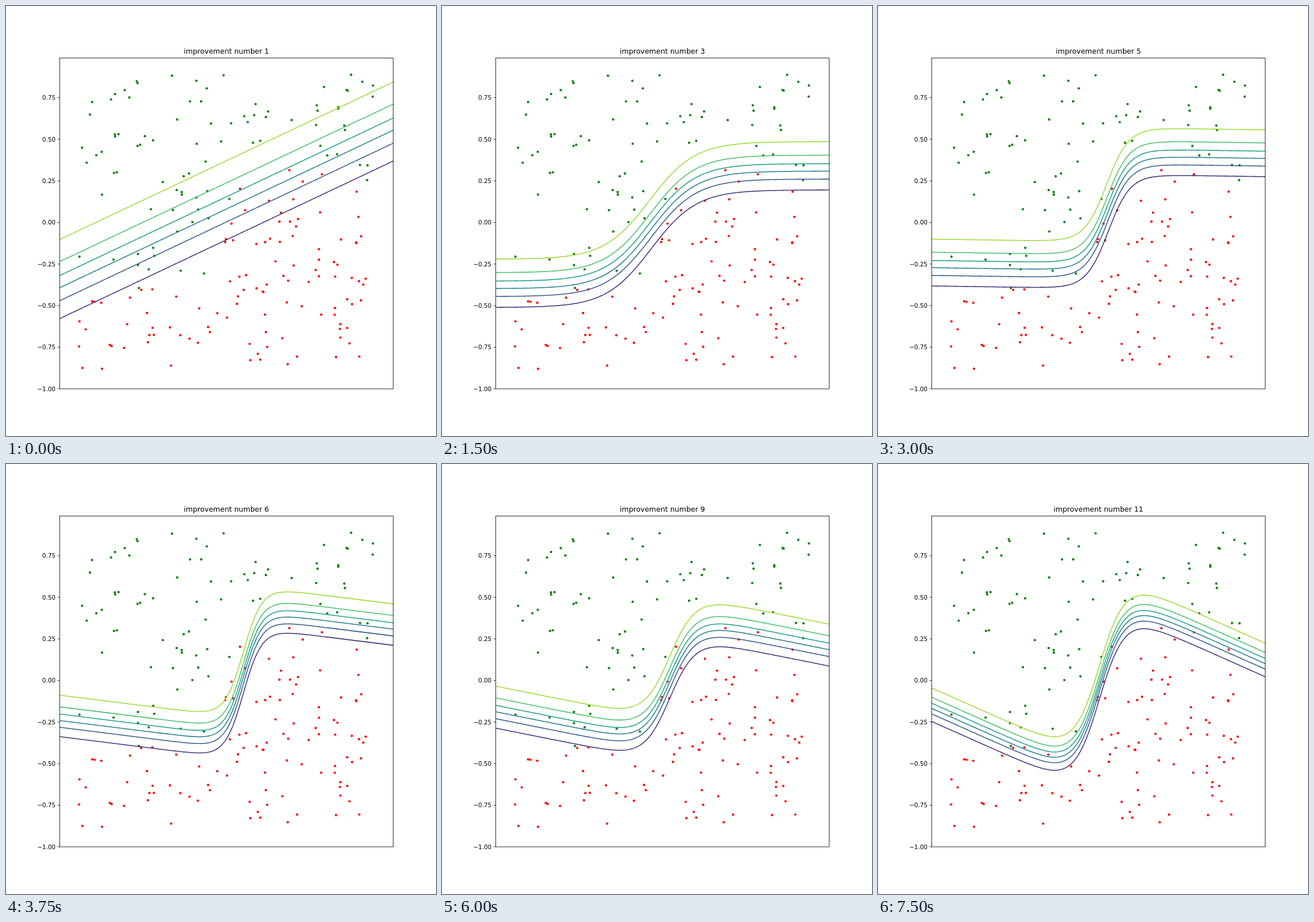
An HTML page that plays this animation: 748 by 748 pixels, repeating every 8000 ms.

```html
<!DOCTYPE html>
<html lang="en">
<head>
<meta charset="utf-8">
<title>Decision boundary</title>
<style>
  html, body { margin: 0; width: 100%; height: 100%; overflow: hidden; background: #fff; }
  svg { display: block; width: 100%; height: 100%; }
  text { font: 10.39px "DejaVu Sans", sans-serif; }
  #title { font-size: 12.47px; }
</style>
</head>
<body>
<svg id="plot" viewBox="0 0 748 748"></svg>
<script>
const STEP = 750, LOOP = 8000;
const LEFT = 93.5, RIGHT = 673.5, TOP = 90.5, BOTTOM = 666;
const svg = document.getElementById('plot');

function add(tag, attrs, text = '') {
  const node = document.createElementNS('http://www.w3.org/2000/svg', tag);
  for (const key in attrs) node.setAttribute(key, attrs[key]);
  node.textContent = text;
  svg.append(node);
  return node;
}

// Each fit is a tilted S-curve: vertical middle, slope, half rise, centre and width.
// spread is the distance between the outer contours, lean their sideways shift,
// ramp half the length of a straight middle part.
const base = { mid: 326.5, slope: 0, rise: 0, center: 366, width: 45, spread: 73, lean: 0, ramp: 1 };
const fits = {
  1: { mid: 277.5, slope: -0.4724, spread: 137.5 },
  2: { mid: 330, rise: 150, width: 180, spread: 114 },
  3: { mid: 338.2, rise: 102.2, center: 361, width: 79, spread: 84, lean: 3 },
  5: { mid: 310.7, slope: 0.015, rise: 99.4, center: 397.5, width: 38.5, spread: 81.5, lean: 3 },
  6: { slope: 0.125, rise: 115.7, center: 413, width: 32.5, spread: 72 },
  8: { rise: 102.3, center: 411, width: 29, spread: 74, lean: -22, ramp: 55.4 },
  9: { mid: 335, slope: 0.2, rise: 112, center: 396 },
  10: { mid: 352.75, slope: 0.66, rise: 210.8, center: 388, width: 54 },
  11: { mid: 351.25, slope: 0.445, rise: 168, center: 385, spread: 58.4 }
};

// A step without its own fit lies halfway between its neighbours.
function fitAt(step) {
  if (fits[step]) return { ...base, ...fits[step] };
  const before = fitAt(step - 1), after = fitAt(step + 1), mean = {};
  for (const key in base) mean[key] = (before[key] + after[key]) / 2;
  return mean;
}

function curveY({ mid, slope, rise, center, width, spread, lean, ramp }, share, x) {
  const u = x - center - lean * share;
  const bend = width / (2 * ramp) *
    Math.log(Math.cosh((u + ramp) / width) / Math.cosh((u - ramp) / width));
  return mid + spread * share + slope * u - rise * bend;
}

function curvePath(fit, share) {
  const points = [];
  for (let x = LEFT; x <= RIGHT; x += 2) points.push(x + ' ' + curveY(fit, share, x).toFixed(2));
  return 'M' + points.join('L');
}

// Samples: uniform noise, coloured by the side of the final boundary.
let seed = 7;
function random() {
  seed = (seed * 16807) % 2147483647;
  return seed / 2147483647;
}
const finalFit = fitAt(11);
for (let i = 0; i < 198; i++) {
  const cx = 127 + 514 * random(), cy = 119 + 514 * random();
  const noise = 60 * (random() - 0.5);
  const above = cy + noise < curveY(finalFit, 0.5, cx);
  add('circle', { cx, cy, r: 2.1, fill: above ? '#008000' : '#ff0000' });
}

// Contours of a logistic output at levels 0.9, 0.75 ... 0.15.
const logit = p => Math.log(p / (1 - p));
const colors = ['#a0da39', '#4ac16d', '#1fa187', '#277f8e', '#365c8d', '#46327e'];
const contours = colors.map((stroke, i) => ({
  share: (logit(0.9) - logit(0.9 - 0.15 * i)) / (logit(0.9) - logit(0.15)),
  path: add('path', { fill: 'none', stroke, 'stroke-width': 1.56 })
}));

// Axes
const ink = { fill: 'none', stroke: '#000', 'stroke-width': 0.83 };
add('rect', { x: LEFT, y: TOP, width: RIGHT - LEFT, height: BOTTOM - TOP, ...ink });
for (let value = -1; value < 1; value += 0.25) {
  const y = 376.5 - value * 289.4;
  add('path', { d: `M${LEFT} ${y}h-3.6`, ...ink });
  add('text', { x: 86.2, y: y + 3.8, 'text-anchor': 'end' }, value.toFixed(2).replace('-', '\u2212'));
}
const title = add('text', { id: 'title', x: 383.4, y: 83.3, 'text-anchor': 'middle' });

const start = performance.now();
let shown = 0;
function draw() {
  const step = 1 + Math.floor(((performance.now() - start) % LOOP) / STEP);
  if (step !== shown) {
    shown = step;
    title.textContent = 'improvement number ' + step;
    const fit = fitAt(step);
    for (const { share, path } of contours) path.setAttribute('d', curvePath(fit, share));
  }
  requestAnimationFrame(draw);
}
draw();
</script>
</body>
</html>
```
